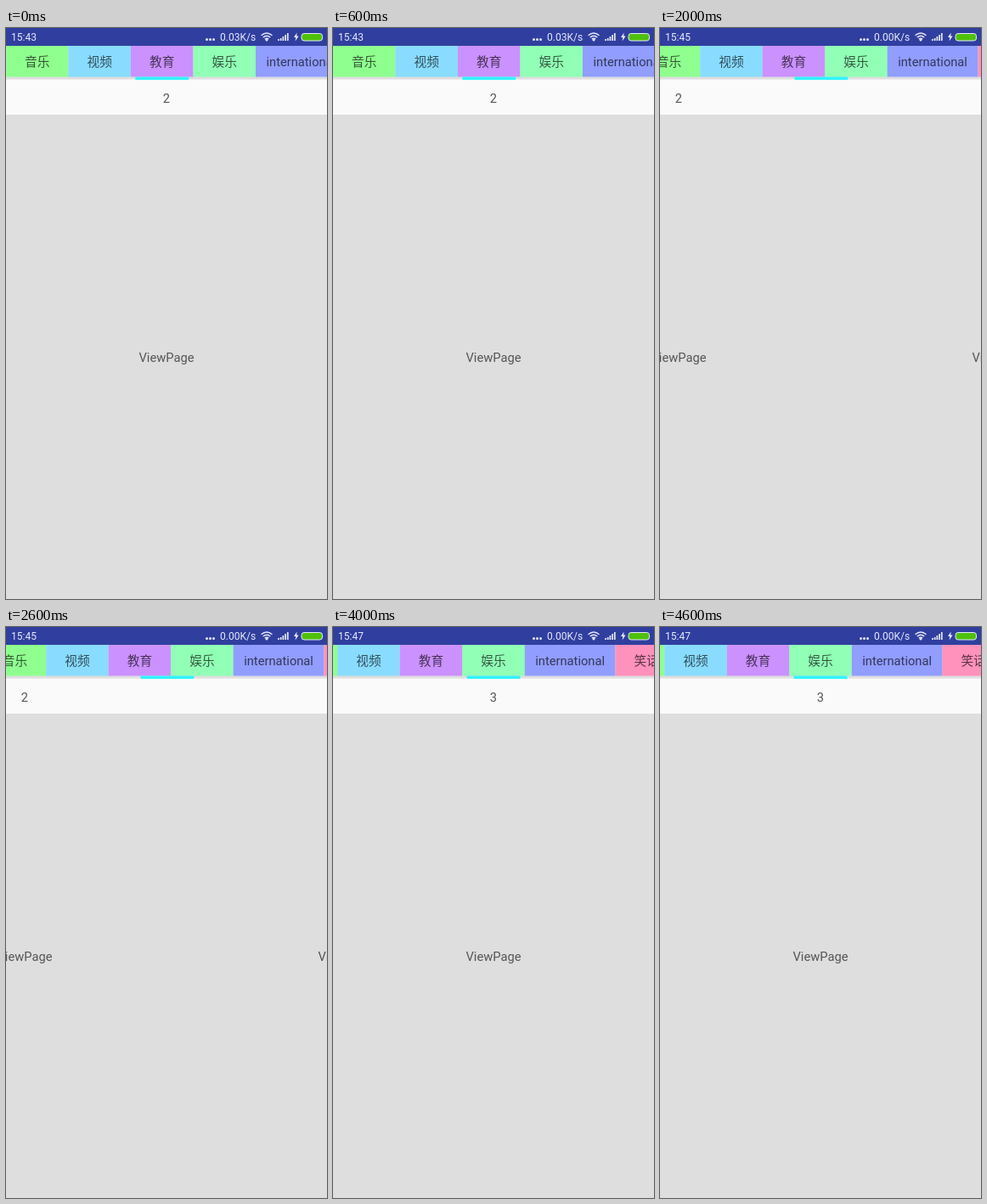
These frames come from a looping animation (378x672 px, 5 s). An HTML page:

```html
<!DOCTYPE html>
<html lang="zh-CN">
<meta charset="utf-8">
<title>Tabs</title>
<style>
html, body { margin: 0; height: 100%; overflow: hidden; background: #dedede; }
svg { display: block; width: 378px; height: 672px; }
text { font: 14.7px Roboto, "Noto Sans CJK SC", "Noto Sans CJK", sans-serif; text-anchor: middle; fill: #555; }
#tabs text { fill: #000; fill-opacity: .65; }
#status text { font-size: 12px; fill: #e6e9fa; text-anchor: start; }
</style>
<svg viewBox="0 0 378 672">
  <rect width="378" height="672" fill="#dedede"/>
  <rect y="60.5" width="378" height="41.5" fill="#fafafa"/>
  <g id="pages"></g>
  <g id="tabs"></g>
  <rect id="mark" y="57.5" width="63" height="3.5" rx="1" fill="#2ff4ff"/>
  <g id="status" fill="#e6e9fa">
    <rect width="378" height="21" fill="#303f9f"/>
    <text id="clock" x="6" y="15.3"></text>
    <text id="speed" x="252" y="15.3"></text>
    <circle cx="236.5" cy="13.5" r="1.5"/>
    <circle cx="240.5" cy="13.5" r="1.5"/>
    <circle cx="244.5" cy="13.5" r="1.5"/>
    <g fill="none" stroke="#e6e9fa" stroke-width="1.4">
      <path d="M300.5 8.7Q307 3.2 313.5 8.7M302.7 11Q307 7.3 311.3 11M304.8 13.1Q307 11.3 309.2 13.1"/>
      <path d="M321 15v-2M323.7 15v-3M326.4 15v-5M329.1 15v-7M331.8 15v-9" stroke-width="1.7"/>
      <rect x="348" y="6.5" width="24.5" height="8.5" rx="3" fill="#4fc00c" stroke-width="1"/>
    </g>
    <circle cx="307" cy="14.2" r="1.3"/>
    <path d="M342.6 5.5L339 11h2.3l-.7 4.5 4-6h-2.4z"/>
  </g>
</svg>
<script>
const $ = id => document.getElementById(id);
const PAGE = 378, TAB = 73.5;
const tabs = [
  ['音乐', '#8fff8f', TAB], ['视频', '#89dcff', TAB], ['教育', '#cb91ff', TAB],
  ['娱乐', '#91ffb5', TAB], ['international', '#919dff', 106.7], ['笑话', '#ff91bd', TAB]
];
// pager offset, tab strip scroll, network speed; the pose steps once a second
const poses = [
  [0, 0, '0.03'], [99, 9.2, '0.04'], [167, 26.3, '0.00'],
  [348, 62.7, '0.04'], [378, 68.2, '0.00']
];

let x = 0, strip = '';
for (const [name, color, w] of tabs) {
  strip += `<rect x="${x}" y="21" width="${w}" height="36.5" fill="${color}"/>
    <text x="${x + w / 2}" y="45.3">${name}</text>`;
  x += w;
}
$('tabs').innerHTML = strip;
$('pages').innerHTML = [2, 3].map((n, i) => {
  const cx = PAGE * (i + .5);
  return `<text x="${cx}" y="87.7">${n}</text><text x="${cx}" y="392.7">ViewPage</text>`;
}).join('');

let shown = -1;
function draw(now) {
  const step = Math.floor(now / 1000) % poses.length;
  if (step !== shown) {
    const [offset, scroll, speed] = poses[shown = step];
    $('pages').setAttribute('transform', `translate(${-offset})`);
    $('tabs').setAttribute('transform', `translate(${-scroll})`);
    $('mark').setAttribute('x', (2 + offset / PAGE) * TAB + 5.25 - scroll);
    $('clock').textContent = '15:' + (43 + step);
    $('speed').textContent = speed + 'K/s';
  }
  requestAnimationFrame(draw);
}
draw(performance.now());
</script>
</html>
```
